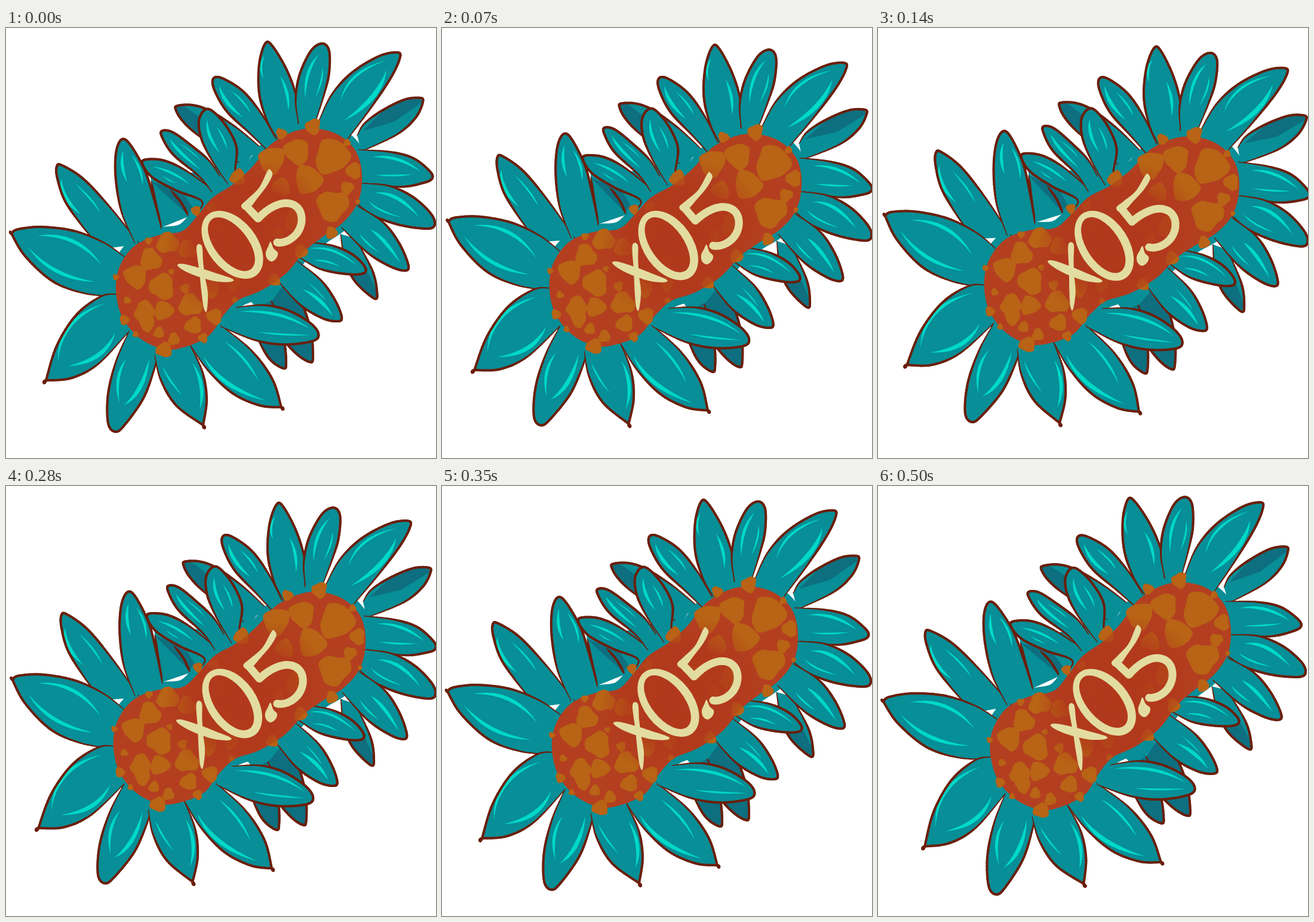
Animation, 720 px wide and 720 px high, one loop 560 ms. Source, as an HTML page with a canvas:

```html
<!DOCTYPE html>
<html lang="en">
<head>
<meta charset="utf-8">
<title>x0.5</title>
<style>
  html, body { margin: 0; width: 100%; height: 100%; overflow: hidden; background: #fff; }
  canvas { display: block; width: 100vmin; height: 100vmin; }
</style>
</head>
<body>
<canvas width="720" height="720"></canvas>
<script>
const ctx = document.querySelector('canvas').getContext('2d');
const TEAL = '#078e97', DARK = '#0d6f7f', GLEAM = '#00d9c8', LINE = '#6b1f0c';
const BODY = '#b33f20', BUMP = '#b86315', CREAM = '#e3dca0';

const parse = s => s.trim().split(/\s+/).map(p => p.split(',').map(Number));

// Points along a Catmull-Rom curve
function curve(pts, closed) {
  const n = pts.length, out = [];
  const at = i => closed ? pts[(i + n) % n] : pts[Math.max(0, Math.min(n - 1, i))];
  for (let i = 0; i < (closed ? n : n - 1); i++) {
    const [a, b, c, d] = [at(i - 1), at(i), at(i + 1), at(i + 2)];
    for (let k = 0; k < 10; k++) {
      const t = k / 10;
      out.push([0, 1].map(j => b[j] + t / 2 * (c[j] - a[j] +
        t * (2 * a[j] - 5 * b[j] + 4 * c[j] - d[j] + t * (3 * (b[j] - c[j]) + d[j] - a[j])))));
    }
  }
  if (!closed) out.push(pts[n - 1]);
  return out;
}

function trace(pts) {
  ctx.beginPath();
  pts.forEach(p => ctx.lineTo(...p));
  ctx.closePath();
}

function fill(pts, color) {
  trace(pts);
  ctx.fillStyle = color;
  ctx.fill();
}

const blob = (s, color) => fill(curve(parse(s), true), color);

// Outline that thins out towards both ends
function taper(pts) {
  const n = pts.length - 1;
  ctx.strokeStyle = LINE;
  for (let i = 0; i < n; i++) {
    ctx.lineWidth = 1.2 + 2.8 * Math.min(1, 5 * Math.min(i, n - i) / n);
    ctx.beginPath();
    ctx.moveTo(...pts[i]);
    ctx.lineTo(...pts[i + 1]);
    ctx.stroke();
  }
}

// Lens from a to b, bent through m, w wide
function gleam(s) {
  const [a, m, b, [w]] = parse(s);
  const len = Math.hypot(b[0] - a[0], b[1] - a[1]);
  const nx = (a[1] - b[1]) / len * w, ny = (b[0] - a[0]) / len * w;
  const cx = 2 * m[0] - (a[0] + b[0]) / 2, cy = 2 * m[1] - (a[1] + b[1]) / 2;
  ctx.beginPath();
  ctx.moveTo(...a);
  ctx.quadraticCurveTo(cx + nx, cy + ny, ...b);
  ctx.quadraticCurveTo(cx - nx, cy - ny, ...a);
  ctx.fillStyle = GLEAM;
  ctx.fill();
}

function petal(edge, gleams = [], shade = '', color = TEAL) {
  const pts = curve(parse(edge));
  fill(pts, color);
  if (shade) {
    ctx.save();
    trace(pts);
    ctx.clip();
    fill(parse(shade), DARK);
    ctx.restore();
  }
  gleams.forEach(gleam);
  taper(pts);
}

// Rounded, slightly triangular wart
function bump(x, y, r, turn = x * 7 + y * 3) {
  const pts = [];
  for (let i = 0; i < 9; i++) {
    const a = i * Math.PI * 2 / 9;
    const d = r * (1 + .15 * Math.cos(3 * a + turn) + .05 * Math.sin(i * 5 + x));
    pts.push([x + d * Math.cos(a), y + d * Math.sin(a)]);
  }
  fill(curve(pts, true), BUMP);
}

function glow(x, y, rx, ry, angle, alpha) {
  ctx.save();
  ctx.translate(x, y);
  ctx.rotate(angle);
  ctx.scale(rx, ry);
  const g = ctx.createRadialGradient(0, 0, 0, 0, 0, 1);
  g.addColorStop(0, `rgba(177,56,27,${alpha})`);
  g.addColorStop(.65, `rgba(177,56,27,${alpha * .8})`);
  g.addColorStop(1, 'rgba(177,56,27,0)');
  ctx.fillStyle = g;
  ctx.fillRect(-1, -1, 2, 2);
  ctx.restore();
}

const peanut = curve(parse(`447,192 480,174 515,168 555,178 585,205 596,245 590,290
  565,325 530,350 500,374 470,410 430,438 390,455 365,480 340,515 300,534 265,538
  225,520 195,485 184,440 190,400 215,365 255,347 295,340 320,315 345,285 380,262
  410,235 430,210`), true);

function backPetals() {
  fill(parse('242,250 258,335 320,310 380,262 420,200 330,240'), TEAL);
  fill(parse('242,256 296,276 312,300 304,312 274,285'), DARK);
  taper(curve(parse('243,256 250,290 260,334')));
  taper(curve(parse('276,272 293,292 305,314')));
  petal('430,203 385,166 340,138 312,129 288,130 284,136 296,156 325,182 390,225', [],
    '280,128 300,132 326,150 340,190 310,185');
  petal('560,345 568,390 585,425 617,453 621,440 613,405 585,352', [],
    '572,405 606,410 625,450 600,450');
  petal('465,425 492,455 510,505 514,552 508,559 488,547 462,520 420,470', [], '', DARK);
  petal('405,480 425,527 443,556 465,570 469,560 466,525 455,480 440,450', [], '', DARK);
  fill(parse('400,445 420,470 447,455 466,428 490,400 470,400'), TEAL);
}

function topPetals() {
  petal('318,312 328,290 285,272 245,250 228,227 236,220 265,222 300,238 345,270',
    ['246,232 278,243 308,262 4', '262,247 272,254 285,260 2']);
  petal('345,275 323,248 280,212 261,182 262,172 280,175 312,198 340,222 358,248',
    ['274,185 292,208 326,237 5', '290,193 310,207 325,221 2']);
  petal('372,262 345,222 327,185 323,155 333,137 347,140 370,166 386,200 384,240 392,258',
    ['337,153 341,180 358,209 5', '352,165 364,185 370,203 3']);
  petal('445,212 410,178 370,140 349,104 347,85 362,84 397,106 428,144 452,186',
    ['357,96 370,124 397,150 6', '377,105 397,124 409,142 3']);
  petal('455,186 437,155 424,110 424,60 434,26 446,30 470,70 486,115 489,160',
    ['433,46 427,64 431,84 4', '459,80 470,108 473,138 5']);
  petal('490,160 485,122 491,80 510,39 529,26 541,38 541,75 533,110 519,155',
    ['524,44 506,76 501,118 5', '530,66 528,88 518,116 3']);
}

function rightPetals() {
  petal('588,180 600,160 630,138 667,120 693,117 698,124 686,150 655,178 595,207', [],
    '598,172 640,130 690,116 697,124 650,157');
  petal('522,160 545,112 580,74 625,47 656,41 659,52 644,84 610,135 572,186',
    ['635,55 585,81 560,122 4', '637,70 614,115 566,155 8']);
  petal('590,204 640,207 680,217 708,238 714,251 700,259 660,266 600,260',
    ['613,216 655,220 695,241 5', '618,246 650,247 682,245 3']);
  petal('592,260 640,264 680,282 710,309 718,328 706,336 660,330 615,314 585,292',
    ['617,276 655,285 692,317 6', '607,290 628,305 662,317 3']);
  petal('588,298 630,324 657,358 673,394 670,406 645,400 605,376 562,334',
    ['610,337 634,358 660,393 6', '592,345 605,360 625,376 3']);
  petal('500,358 545,364 580,379 601,400 598,411 570,412 525,403 488,382',
    ['508,370 547,373 588,398 4', '515,389 537,391 560,400 3']);
  petal('485,388 526,421 550,454 562,483 556,491 530,486 492,463 456,424',
    ['496,437 525,456 547,482 6', '505,425 523,442 535,457 2']);
}

function leftPetals() {
  petal('160,370 128,332 99,290 86,252 85,232 94,230 130,253 175,301 224,362',
    ['93,252 99,282 126,313 7', '115,260 141,286 158,310 3']);
  petal('216,360 194,310 184,255 184,210 193,187 207,194 232,237 247,285 260,336',
    ['196,205 195,232 203,258 5', '210,212 224,237 229,264 4']);
  petal('202,386 165,360 115,340 60,333 20,337 9,344 9,344 32,382 78,424 130,444 184,450',
    ['52,348 112,357 160,397 6', '37,367 85,407 149,425 6']);
  petal('190,446 160,449 118,480 85,532 67,590 67,590 110,586 155,562 206,508',
    ['87,560 107,499 166,461 6', '104,566 154,548 183,510 7']);
  petal('206,508 185,556 171,612 171,662 184,676 200,663 230,620 248,572 254,545',
    ['202,553 188,587 190,627 5', '240,553 224,602 197,632 7']);
  petal('249,548 259,589 285,632 330,665 330,665 336,622 329,576 308,530',
    ['312,560 327,600 324,640 6', '262,566 275,590 296,616 3']);
  petal('308,530 338,573 380,612 425,632 461,635 461,635 446,588 411,540 360,498',
    ['331,550 370,594 435,624 7', '366,525 398,554 423,591 4']);
  petal('385,468 430,464 470,472 507,492 523,511 514,524 465,530 415,522 360,500',
    ['390,475 455,480 509,504 5', '422,509 463,513 510,514 3']);
}

function warts() {
  [[445, 221, 22], [461, 177, 9], [487, 207, 21], [514, 165, 13], [546, 215, 29],
   [582, 239, 13], [571, 268, 11], [506, 254, 23], [547, 297, 26], [545, 343, 10],
   [589, 291, 4], [571, 192, 6], [461, 266, 15], [425, 315, 12], [483, 322, 17],
   [494, 374, 11], [449, 422, 10], [388, 250, 13], [318, 306, 8], [455, 343, 9]
  ].forEach(b => bump(...b));
  [[271, 360, 18], [242, 388, 18], [217, 416, 19], [261, 433, 21], [304, 371, 15],
   [239, 356, 6], [184, 417, 5], [277, 408, 5], [300, 436, 8], [203, 456, 6],
   [198, 489, 8], [232, 474, 17], [264, 473, 16], [236, 495, 13], [309, 464, 19],
   [314, 498, 14], [281, 521, 10], [256, 510, 9], [265, 539, 13], [330, 519, 8],
   [349, 483, 13], [217, 513, 5], [343, 436, 15], [383, 455, 5], [380, 427, 12],
   [345, 300, 8]
  ].forEach(b => bump(...b));
}

function lettering() {
  blob('287,397 297,395 325,402 350,410 379,420 376,425 350,424 318,415 296,405', CREAM);
  blob('319,367 328,365 330,390 333,415 338,445 336,474 331,468 327,440 324,410', CREAM);

  ctx.beginPath();
  ctx.ellipse(379, 363, 65, 41, .9, 0, Math.PI * 2);
  ctx.ellipse(377.5, 362, 53, 27.5, .9, 0, Math.PI * 2);
  ctx.fillStyle = CREAM;
  ctx.fill('evenodd');

  blob('443,358 448,369 455,376 453,385 445,391 437,386 435,376 439,366', CREAM);

  blob('438,239 443,238 446,246 437,264 421,285 410,299 399,304 394,297 405,286 424,267', CREAM);
  ctx.strokeStyle = CREAM;
  ctx.lineWidth = 13;
  ctx.beginPath();
  ctx.moveTo(402, 298);
  ctx.lineTo(422, 319);
  ctx.bezierCurveTo(439, 301, 460, 290, 476, 294);
  ctx.bezierCurveTo(498, 299, 500, 327, 487, 344);
  ctx.bezierCurveTo(478, 355, 465, 361, 454, 359);
  ctx.stroke();
}

function scene(degrees) {
  ctx.setTransform(1, 0, 0, 1, 0, 0);
  ctx.fillStyle = '#fff';
  ctx.fillRect(0, 0, 720, 720);
  ctx.translate(360, 360);
  ctx.rotate(degrees * Math.PI / 180);
  ctx.translate(-360, -360);
  ctx.lineCap = ctx.lineJoin = 'round';

  backPetals();
  trace(peanut);
  ctx.strokeStyle = TEAL;
  ctx.lineWidth = 24;
  ctx.stroke();
  topPetals();
  rightPetals();
  leftPetals();

  fill(peanut, BODY);
  warts();
  ctx.save();
  trace(peanut);
  ctx.clip();
  glow(398, 350, 145, 115, -.7, .95);
  ctx.restore();
  glow(412, 437, 30, 10, -.45, .6);
  lettering();
}

// Stepped rocking, 70 ms a step, with a rest at either end
const swing = [0, 3.3, 4.9, 4.9, 3.3, 0, -2.7, -2.7];
let start, shown;
function tick(now) {
  start ??= now;
  const angle = swing[Math.floor((now - start) / 70) % swing.length];
  if (angle !== shown) scene(shown = angle);
  requestAnimationFrame(tick);
}
scene(shown = swing[0]);
requestAnimationFrame(tick);
</script>
</body>
</html>
```
